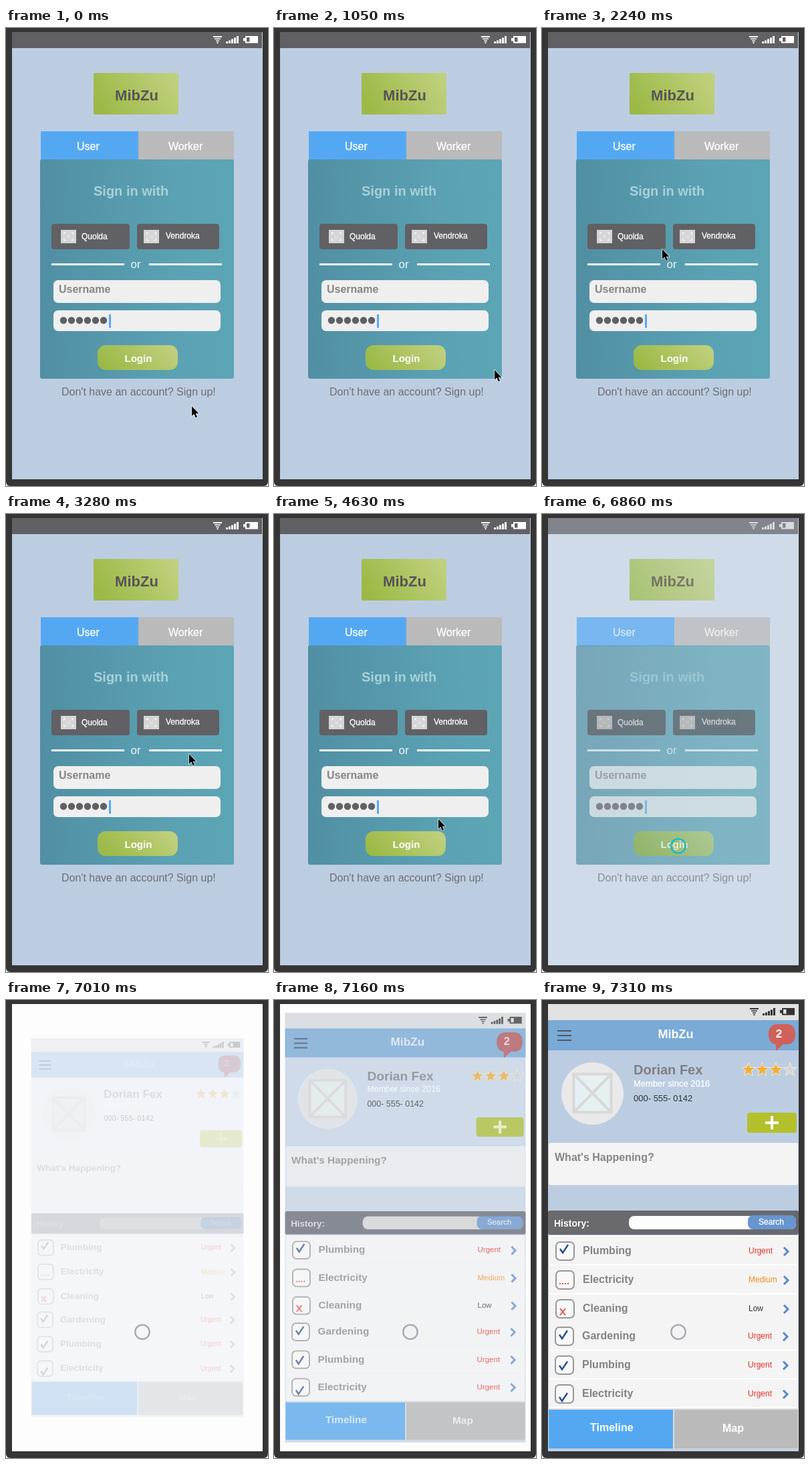
An HTML page that plays this animation: 392x683 px, repeating every 8000 ms.

```html
<!DOCTYPE html>
<html lang="en">
<head>
<meta charset="utf-8">
<title>App sign-in</title>
<style>
html, body { margin: 0; width: 100%; height: 100%; overflow: hidden; background: #fff; }
svg { display: block; width: 392px; height: 683px; }
text { font: 16px "Liberation Sans", Arial, sans-serif; white-space: pre; }
.b { font-weight: bold; }
.w { fill: #fff; }
.w:not(.b) { stroke: #fff; stroke-width: .3; }
.g { fill: #858585; }
.m { text-anchor: middle; }
.scene > * { opacity: var(--o); }
</style>
</head>
<body>
<svg viewBox="0 0 392 683">
  <defs>
    <linearGradient id="green" x1="0" y1=".6" x2="1" y2=".3">
      <stop offset="0" stop-color="#9bb946"/><stop offset="1" stop-color="#bfd07d"/>
    </linearGradient>
    <linearGradient id="teal">
      <stop offset="0" stop-color="#518fa3"/><stop offset=".75" stop-color="#5ba3b4"/><stop offset="1" stop-color="#5ca5b5"/>
    </linearGradient>
    <clipPath id="screen"><rect x="9" y="6" width="375" height="667"/></clipPath>
    <g id="status">
      <path d="M310 12h13v2h-13zM312 15.5h9v1.5h-9zM314 18.5h5v1.5h-5zM315.5 21h2v2h-2z"/>
      <path d="M329 20h3v3h-3zM333 18.5h3v4.500h-3zM337 16.500h3v6.500h-3zM341 14.500h3v8.500h-3zM345 12h3v11h-3z"/>
      <path fill-rule="evenodd" d="M358 12h19v10.500h-19v-3h-3v-4.500h3zM360 14v6.500h4.500v-6.500z"/>
    </g>
    <g id="thumb">
      <rect width="23" height="20" fill="#d5d5d5"/>
      <path d="M4 3.500h4l-4 4zM19 3.500h-4l4 4zM4 16.500h4l-4-4zM19 16.500h-4l4-4z" fill="#f3f3f3"/>
      <path d="M8 7l7 6M15 7l-7 6" stroke="#e9e9e9"/>
    </g>
    <path id="star" d="M0-10.500L2.700-3.600 10-3.200 4.300 1.500 6.200 8.700 0 4.600-6.200 8.700-4.300 1.500-10-3.200-2.700-3.600z" stroke="#f3ecd9"/>
  </defs>

  <rect y="-10" width="392" height="693" rx="6" fill="#353535"/>
  <rect x="9" y="6" width="375" height="667" fill="#fdfdfd"/>

  <g clip-path="url(#screen)">
    <g id="login" class="scene">
      <rect x="9" y="6" width="375" height="667" fill="#bccde2"/>
      <rect x="9" y="6" width="374" height="24" fill="#616064"/>
      <use href="#status" fill="#fff"/>
      <rect x="131" y="67" width="127" height="62" rx="2" fill="url(#green)"/>
      <text class="b m" x="195.500" y="108" fill="#555" style="font-size:22px">MibZu</text>
      <rect x="52" y="154" width="146" height="43" fill="#54a8f2"/>
      <rect x="198" y="154" width="143" height="43" fill="#bababb"/>
      <text class="w" x="106" y="182">User</text>
      <text class="w" x="243" y="182">Worker</text>
      <rect x="51" y="196" width="290" height="327" rx="3" fill="url(#teal)"/>
      <text class="b" x="131" y="250" fill="#a8d1d8" style="font-size:20px">Sign in with</text>
      <rect x="68" y="292" width="117" height="38" rx="4" fill="#616064"/>
      <rect x="196" y="292" width="123" height="38" rx="4" fill="#616064"/>
      <use href="#thumb" x="82" y="301"/>
      <use href="#thumb" x="206" y="301"/>
      <text class="w" x="113" y="315" style="font-size:12px">Quolda</text>
      <text class="w" x="239" y="314" style="font-size:12px">Vendroka</text>
      <path d="M68 352.500h109M214 352.500h109" stroke="#f4f9fa" stroke-width="3"/>
      <text x="186.500" y="358" fill="#eef6f7" style="font-size:17px">or</text>
      <rect x="71" y="376" width="250" height="34" rx="7" fill="#efefef"/>
      <text class="b g" x="79" y="395">Username</text>
      <rect x="71" y="421" width="250" height="31" rx="7" fill="#efefef"/>
      <path d="M86 436h60.100" stroke="#616064" stroke-width="10.400" stroke-linecap="round" stroke-dasharray="0 12"/>
      <rect x="154" y="427" width="3" height="20" fill="#54a8f2"/>
      <rect x="137" y="473" width="120" height="37" rx="12" fill="url(#green)"/>
      <text class="b w" x="177.500" y="498" style="font-size:15px">Login</text>
      <text x="83" y="548" fill="#6f6e72">Don't have an account? Sign up!</text>
    </g>

    <g id="home" class="scene">
      <rect x="9" y="6" width="375" height="667" fill="#bccde2"/>
      <rect x="9" y="6" width="375" height="24" fill="#e1e1e1"/>
      <use href="#status" x="1" fill="#333"/>
      <rect x="9" y="30" width="375" height="45" fill="#7aaad6"/>
      <path d="M23 46h21M23 53h21M23 60h21" stroke="#50596a" stroke-width="2"/>
      <text class="b w m" x="200" y="57" style="font-size:18px">MibZu</text>
      <path d="M352 36h14q13 0 13 15t-13 15h-5l-11 10v-10q-11-1-11-15t13-15z" fill="#d1605a"/>
      <text class="b w m" x="354.500" y="56" style="font-size:17px">2</text>
      <circle cx="75.500" cy="139.500" r="46.500" fill="#e9e9e9"/>
      <path d="M47.500 110.500h56v57h-56zl56 57M103.500 110.500l-56 57" fill="#e5f0f3" stroke="#d8d8d8" stroke-width="4"/>
      <text class="b" x="137" y="111" fill="#7f7f82" style="font-size:20px">Dorian Fex</text>
      <text class="w" x="137" y="129" style="font-size:13px">Member since 2016</text>
      <text x="137" y="151" fill="#333" style="font-size:13px">000- 555- 0142</text>
      <use href="#star" x="309" y="104" fill="#f3ae38"/>
      <use href="#star" x="329.500" y="104" fill="#f3ae38"/>
      <use href="#star" x="350" y="104" fill="#f3ae38"/>
      <use href="#star" x="371" y="104" fill="#d6d6d6"/>
      <rect x="307" y="168" width="74" height="30" rx="4" fill="#b2c12b"/>
      <path d="M334 183h20M344 173v20" stroke="#fff" stroke-width="4"/>
      <rect x="10" y="213" width="373" height="63" rx="3" fill="#f4f4f4"/>
      <text class="b g" x="19" y="240">What's Happening?</text>
      <rect x="9" y="314" width="375" height="36" rx="3" fill="#69696e"/>
      <text class="b w" x="18" y="338" style="font-size:14px">History:</text>
      <rect x="130" y="322" width="250" height="20" rx="8" fill="#fdfdfd"/>
      <rect x="308" y="321" width="72" height="21" rx="8" fill="#6795cf"/>
      <text class="w" x="324" y="335" style="font-size:12px">Search</text>
      <rect x="10" y="351" width="373" height="258" fill="#fdfdfd"/>
      <rect x="9" y="609" width="375" height="61" fill="#dedede"/>
      <rect x="10" y="611" width="186" height="58" fill="#54a8f2"/>
      <rect x="198" y="611" width="185" height="58" fill="#bababb"/>
      <text class="b w" x="72" y="643">Timeline</text>
      <text class="b w" x="270" y="644">Map</text>
    </g>
  </g>

  <circle id="ring" cx="204" cy="495" r="10.700" fill="none" stroke-width="2.300"/>
  <path id="cursor" d="M0 0v14.500l3.300-3 2.400 5.500 2.400-1-2.400-5.300h4.600z" stroke="#fff" stroke-width="1.200" paint-order="stroke"/>
</svg>

<script>
const $ = id => document.getElementById(id);
const [login, home, ring, cursor] = ['login', 'home', 'ring', 'cursor'].map($);

const tones = { Urgent: '#df322c', Medium: '#ee8c1f', Low: '#333' };

// job, urgency, baseline, mark, drop of the mark inside its box
const jobs = [
  ['Plumbing', 'Urgent', 379, 'check', 11],
  ['Electricity', 'Medium', 422, 'dots', 20],
  ['Cleaning', 'Low', 465, 'cross', 18],
  ['Gardening', 'Urgent', 506, 'check', 12],
  ['Plumbing', 'Urgent', 549, 'check', 15],
  ['Electricity', 'Urgent', 592, 'check', 19]
];

const marks = {
  check: '<path d="M-6 0l4 6 8-12" fill="none" stroke="#2f4f8c" stroke-width="2.500"/>',
  dots: '<path d="M-7 0h2m2 0h2m2 0h2m2 0h2" stroke="#d9534f" stroke-width="2"/>',
  cross: '<path d="M-6-4l8 10M2-4l-8 10" stroke="#d9534f" stroke-width="2"/>'
};

home.insertAdjacentHTML('beforeend', jobs.map(([job, level, y, mark, drop], i) => {
  const x = i < 3 ? 0 : -1, top = y - 19;
  return `<rect x="11" y="${y - 26}" width="371" height="41" fill="#f4f4f4"/>
    <rect x="${21 + x}" y="${top + 1}" width="27" height="27" rx="6" fill="#f8f8f8" stroke="#989898" stroke-width="2"/>
    <g transform="translate(${33 + x},${top + drop})">${marks[mark]}</g>
    <text class="b" x="${61 + x}" y="${y}" fill="#838383">${job}</text>
    <text x="${309 + x}" y="${y - 1}" fill="${tones[level]}" style="font-size:12px">${level}</text>
    <path d="M${362 + x} ${y - 10}l6 6-6 6" fill="none" stroke="#5b86c6" stroke-width="3"/>`;
}).join(''));

const TICK = 150;

// Pointer moves: start, end, steps and evenly spaced waypoints
const moves = [
  [300, 1340, 8, [[278, 564], [296, 546], [315, 526], [330, 510], [336, 485]]],
  [1790, 2830, 8, [[336, 485], [262, 402], [180, 330], [148, 313], [252, 318]]],
  [2980, 3580, 5, [[252, 318], [258, 326], [267, 340], [274, 358], [271, 378], [266, 393]]],
  [3880, 4330, 4, [[266, 393], [262, 418], [255, 448], [251, 461], [255, 439]]],
  [4630, 5220, 5, [[255, 439], [246, 455], [230, 474], [213, 488], [200, 494], [189, 491]]],
  [5660, 5660, 1, [[189, 491], [199, 491]]]
];

function along(points, u) {
  const s = u * (points.length - 1);
  const i = Math.min(Math.floor(s), points.length - 2);
  return points[i].map((v, k) => Math.round(v + (points[i + 1][k] - v) * (s - i)));
}

function pointer(t) {
  const [start, end, steps, points] = moves.findLast(m => t >= m[0]) || moves[0];
  if (t < start) return points[0];
  const step = t >= end ? steps : Math.min(steps, Math.floor((t - start) / TICK) + 1);
  return along(points, step / steps);
}

// Cross-fade stages: login opacity, home opacity, home scale
const stages = [[1, 0, 1], [.7, 0, 1], [0, .2, .847], [0, .7, .96], [0, 1, 1]];

function draw(t) {
  const clicked = t >= 5810;
  const [x, y] = pointer(t);
  cursor.setAttribute('transform', `translate(${x},${y})`);
  cursor.style.display = clicked ? 'none' : '';
  ring.style.display = clicked ? '' : 'none';
  ring.setAttribute('stroke', t < 7010 ? '#1cb6cb' : '#a4a8b8');

  const stage = Math.max(0, Math.min(4, Math.floor((t - 6860) / TICK) + 1));
  const [out, into, scale] = stages[stage];
  login.style.setProperty('--o', out);
  home.style.setProperty('--o', into);
  login.style.display = out ? '' : 'none';
  home.style.display = into ? '' : 'none';
  home.setAttribute('transform', `translate(197 340) scale(${scale}) translate(-197 -340)`);
}

function loop() {
  draw(performance.now() % 8000);
  requestAnimationFrame(loop);
}
loop();
</script>
</body>
</html>
```
